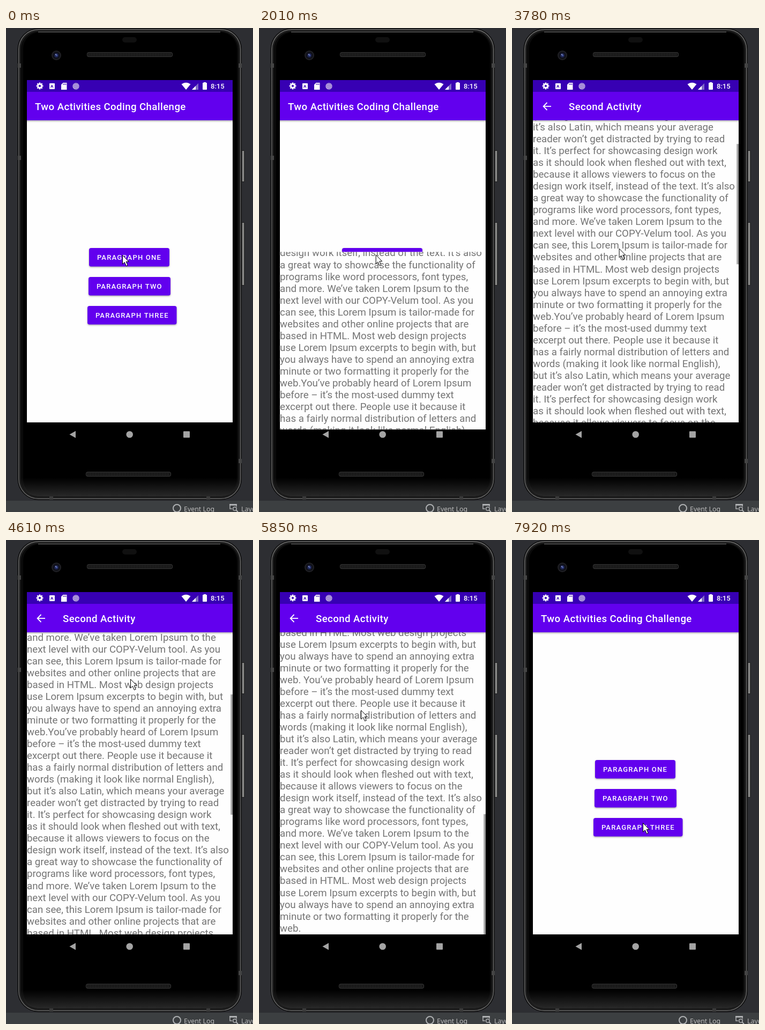
An HTML page with a canvas for the animation above (8 s loop, 461x902 px).

```html
<!DOCTYPE html>
<html lang="en">
<head>
<meta charset="utf-8">
<title>Two activities</title>
<style>
html, body { margin: 0; width: 100%; height: 100%; overflow: hidden; background: #2d2e32; }
canvas { display: block; width: 461px; height: 902px; }
</style>
</head>
<body>
<canvas id="stage"></canvas>
<script>
const W = 461, H = 902, LOOP = 8000;
const PX = 384 / 1080;   // one device pixel on the stage
const DP = PX * 2.625;
const SCREEN = { x: 39, y: 97, w: 384, bar: 119, top: 172, bottom: 735, end: 764 };
const VIEW = SCREEN.bottom - SCREEN.top;
const LINE = 62 * PX, FIRST_BASELINE = 191.6;
const PURPLE = '#6200ee', DARK_PURPLE = '#3700b3', ICON_GRAY = '#aeb0b2';
const TITLE_FONT = `500 ${20 * DP}px Roboto, sans-serif`;
const BODY_FONT = `${20 * DP}px Roboto, sans-serif`;
const LABEL_FONT = `500 ${14 * DP}px Roboto, sans-serif`;
const IDE_FONT = '12.4px "Noto Sans", sans-serif';

const canvas = document.getElementById('stage');
const ratio = window.devicePixelRatio || 1;
canvas.width = W * ratio;
canvas.height = H * ratio;
const c = canvas.getContext('2d');

const opening = [
  'You’ve probably heard of Lorem Ipsum before',
  '– it’s the most-used dummy text excerpt out',
  'there. People use it because it has a fairly',
  'normal distribution of letters and words',
  '(making it look like normal English), but',
  'it’s also Latin, which means your average'
];
const reopening = [
  'before – it’s the most-used dummy text',
  'excerpt out there. People use it because it',
  'has a fairly normal distribution of letters and',
  'words (making it look like normal English),',
  'but it’s also Latin, which means your average'
];
const rest = [
  'reader won’t get distracted by trying to read',
  'it. It’s perfect for showcasing design work',
  'as it should look when fleshed out with text,',
  'because it allows viewers to focus on the',
  'design work itself, instead of the text. It’s also',
  'a great way to showcase the functionality of',
  'programs like word processors, font types,',
  'and more. We’ve taken Lorem Ipsum to the',
  'next level with our COPY-Velum tool. As you',
  'can see, this Lorem Ipsum is tailor-made for',
  'websites and other online projects that are',
  'based in HTML. Most web design projects',
  'use Lorem Ipsum excerpts to begin with, but',
  'you always have to spend an annoying extra',
  'minute or two formatting it properly for the'
];
const heard = 'You’ve probably heard of Lorem Ipsum';
const lines = [
  ...opening, ...rest, 'web.' + heard,
  ...reopening, ...rest, 'web. ' + heard,
  ...reopening, ...rest, 'web.'
];
const MAX_SCROLL = FIRST_BASELINE + (lines.length - 1) * LINE + 15 * PX - SCREEN.bottom;

// Resting places of the pointer; it glides from one to the next
const stops = [
  { from: 0, to: 280, x: 217, y: 423 },
  { from: 1280, to: 1860, x: 219, y: 420 },
  { from: 3150, to: 3270, x: 184, y: 484 },
  { from: 4610, to: 4730, x: 232, y: 259 },
  { from: 5430, to: 5500, x: 234, y: 381 },
  { from: 6530, to: 7240, x: 71, y: 143 },
  { from: 7920, to: LOOP, x: 244, y: 527 }
];

const clamp = v => Math.max(0, Math.min(1, v));
const ramp = (t, from, to) => clamp((t - from) / (to - from));
const ease = v => v * v * (3 - 2 * v);
const mix = (a, b, p) => a + (b - a) * p;

function pointer(t) {
  const next = stops.findIndex(s => s.to >= t);
  const b = stops[next], a = stops[next - 1] || b;
  const p = a === b ? 1 : ease(ramp(t, a.to, b.from));
  return [mix(a.x, b.x, p), mix(a.y, b.y, p)];
}

function scrollAt(t) {
  const first = 290.6, second = 639.2;
  return first * ramp(t, 3270, 4610)
    + (second - first) * ramp(t, 4730, 5430)
    + (MAX_SCROLL - second) * ramp(t, 5500, 5850);
}

function rect(x, y, w, h, fill) {
  c.fillStyle = fill;
  c.fillRect(x, y, w, h);
}
function round(x, y, w, h, r, fill) {
  c.beginPath();
  c.roundRect(x, y, w, h, r);
  c.fillStyle = fill;
  c.fill();
}
function disc(x, y, r, fill) {
  c.beginPath();
  c.arc(x, y, r, 0, 7);
  c.fillStyle = fill;
  c.fill();
}
function ring(x, y, r, color, width) {
  c.beginPath();
  c.arc(x, y, r, 0, 7);
  c.strokeStyle = color;
  c.lineWidth = width;
  c.stroke();
}
function poly(points, fill) {
  c.beginPath();
  points.forEach(([x, y]) => c.lineTo(x, y));
  c.closePath();
  c.fillStyle = fill;
  c.fill();
}
function line(points, color, width) {
  c.beginPath();
  points.forEach(([x, y]) => c.lineTo(x, y));
  c.strokeStyle = color;
  c.lineWidth = width;
  c.stroke();
}
function text(str, x, y, font, fill, spacing = 0) {
  c.font = font;
  c.letterSpacing = spacing + 'px';
  c.fillStyle = fill;
  c.fillText(str, x, y);
}
function fade(x0, y0, x1, y1, ...colors) {
  const g = c.createLinearGradient(x0, y0, x1, y1);
  colors.forEach((color, i) => g.addColorStop(i / (colors.length - 1), color));
  return g;
}
function clipped(x, y, w, h, r, draw) {
  c.save();
  c.beginPath();
  c.roundRect(x, y, w, h, r);
  c.clip();
  draw();
  c.restore();
}

function speaker(x, y, w) {
  round(x, y, w, 9, 4, '#3a3a3a');
  round(x + 1, y + 1, w - 2, 7, 3, '#111');
  c.setLineDash([1, 1.5]);
  for (let row = 2.5; row < 8; row += 2) line([[x + 3, y + row], [x + w - 3, y + row]], '#484848', 1);
  c.setLineDash([]);
}

function sideKey(y, h) {
  round(438, y, 7.5, h, 2, '#1c1c1c');
  rect(440.5, y + 1, 4, h - 2, fade(440, 0, 445, 0, '#4a4a4a', '#9a9a98', '#5c5c5c'));
}

function drawPhone() {
  rect(0, 0, W, H, '#2d2e32');
  sideKey(228, 59);
  sideKey(362, 118);

  // Nested shells: dark edge, metal rim, dark bezel, black face
  const shells = ['#0b0b0b', fade(0, 0, 0, 880, '#6e6e6e', '#5a5a5a', '#666'), '#1d1d1d', '#0a0a0a'];
  [0, 1.5, 3, 6].forEach((inset, i) =>
    round(21.5 + inset, .5 + inset, 418.5 - 2 * inset, 879 - 2 * inset, 39 - inset, shells[i]));
  round(32, 8, 399, 864, 31, '#000');
  clipped(28, 7, 406, 866, 32, () =>
    rect(28, 838, 406, 36, fade(0, 838, 0, 874, 'rgba(40,40,40,0)', '#2a2a2a')));
  line([[60, 7.5], [400, 7.5]], '#777', 1);
  for (const y of [66, 238]) rect(22, y, 6, 8, '#444');
  for (const y of [66, 803]) rect(434, y, 6, 8, '#444');
  for (const x of [81, 374]) rect(x, 873, 7, 6, '#3a3a3a');

  round(217, 17, 27, 10, 5, '#101010');
  speaker(151, 45, 160);
  speaker(149, 827, 159);
  disc(94, 51, 9, '#202024');
  disc(94, 51, 7, '#101119');
  disc(94, 51, 4, '#1d2450');
  disc(94.5, 51, 1.8, '#43549a');
  disc(93, 49.5, 1, '#a9b4dd');
}

function drawIdeBar() {
  rect(0, 881, W, 21, '#3c3f41');
  ring(319, 895, 7, ICON_GRAY, 2);
  text('Event Log', 332, 901, IDE_FONT, '#bbb');
  c.lineWidth = 1.5;
  c.strokeRect(418, 888, 12, 8);
  rect(417, 887, 14, 3, ICON_GRAY);
  disc(427, 896, 5, '#3c3f41');
  ring(427, 896, 3.3, ICON_GRAY, 1.5);
  line([[429, 898], [433, 902]], ICON_GRAY, 2);
  text('Layout', 439, 901, IDE_FONT, '#bbb');
}

function drawGear(x, y) {
  for (let i = 0; i < 8; i++) {
    const a = i * Math.PI / 4;
    line([[x, y], [x + 6.4 * Math.cos(a), y + 6.4 * Math.sin(a)]], '#fff', 2.6);
  }
  disc(x, y, 4.8, '#fff');
  disc(x, y, 2.1, DARK_PURPLE);
}

function drawStatusIcons() {
  drawGear(63, 108);
  round(81, 103, 10, 11, 1, '#fff');
  text('A', 83.1, 111, '700 8px Roboto, sans-serif', DARK_PURPLE);
  poly([[106.5, 102], [113.5, 102], [113.5, 115], [103, 115], [103, 105.5]], '#fff');
  for (let i = 0; i < 3; i++) rect(106.5 + 2.3 * i, 103.5, 1.1, 2.5, DARK_PURPLE);
  disc(130.5, 108.5, 6.2, '#b39bdf');
  clipped(124.7, 102.7, 11.6, 11.6, 5.8, () => {
    for (let i = 0; i < 5; i++) line([[123 + i * 2, 106 + i * 2.5], [133 + i * 2, 103 + i * 2.5]], '#8066c3', .8);
  });
  c.beginPath();
  c.moveTo(336, 115);
  c.lineTo(327.5, 104.7);
  c.quadraticCurveTo(336, 98.8, 344.5, 104.7);
  c.fillStyle = '#fff';
  c.fill();
  poly([[347, 115], [359, 103], [359, 115]], '#806bc7');
  poly([[347, 115], [354, 108], [354, 115]], '#fff');
  rect(369, 101, 4, 2, '#fff');
  round(367, 102, 8, 13, 1, '#fff');
  text('8:15', 382, 113, LABEL_FONT, '#fff');
}

function drawNavIcons() {
  poly([[118.5, 757.5], [130, 751], [130, 764]], '#a4a4a4');
  disc(230.7, 757.5, 6.3, '#a4a4a4');
  round(331, 751.5, 12, 12, 1, '#a4a4a4');
}

function drawAppBar(title, x) {
  const { x: left, w, y, bar, top } = SCREEN;
  rect(left, top, w, 4, fade(0, top, 0, top + 4, 'rgba(0,0,0,.28)', 'rgba(0,0,0,0)'));
  rect(left, y, w, bar - y, DARK_PURPLE);
  rect(left, bar, w, top - bar, PURPLE);
  text(title, x, 153, TITLE_FONT, '#fff', .4);
}

function drawWindow() {
  rect(SCREEN.x, SCREEN.y, SCREEN.w, SCREEN.bottom - SCREEN.y, '#fefefe');
  rect(SCREEN.x, SCREEN.bottom, SCREEN.w, 45, '#000');
}

function drawButton(label, x, y, w, press = 0) {
  c.save();
  c.shadowColor = `rgba(0,0,0,${.32 + .12 * press})`;
  c.shadowBlur = 3 + 4 * press;
  c.shadowOffsetY = 1.5 + 1.5 * press;
  round(x, y, w, 34.5, 4 * DP, PURPLE);
  c.restore();
  clipped(x, y, w, 34.5, 4 * DP, () =>
    disc(217, 425, 110 * press, `rgba(255,255,255,${.24 * press})`));
  text(label, x + 16 * DP, y + 22.2, LABEL_FONT, '#fff', 1.25 * DP);
}

function drawMain(t) {
  drawWindow();
  drawAppBar('Two Activities Coding Challenge', 54);
  const press = ease(ramp(t, 600, 850)) * (1 - ease(ramp(t, 1050, 1400)));
  drawButton('PARAGRAPH ONE', 155, 410, 150, press);
  drawButton('PARAGRAPH TWO', 154, 464, 153);
  drawButton('PARAGRAPH THREE', 152, 518, 166.5);
}

function drawSecond(t) {
  const { x, w, top, bottom } = SCREEN;
  const scroll = scrollAt(t);
  drawWindow();
  clipped(x, top, w, VIEW, 0, () => {
    lines.forEach((str, i) => {
      const y = FIRST_BASELINE + i * LINE - scroll;
      if (y > top - 10 && y < bottom + 20) text(str, x, y, BODY_FONT, '#747474');
    });
    const alpha = t < 3270 ? 0 : .7 * (1 - ramp(t, 6000, 6400));
    const scale = VIEW / (VIEW + MAX_SCROLL);
    rect(419.3, top + scroll * scale, 4 * DP, VIEW * scale, `rgba(125,125,125,${alpha})`);
  });
  drawAppBar('Second Activity', 106);
  line([[73, 146], [59, 146]], '#fff', 1.8);
  line([[65.5, 139], [58.6, 146], [65.5, 153]], '#fff', 1.8);
}

function drawScreen(t) {
  const { x, y, w, end } = SCREEN, h = end - y;
  const closing = ease(ramp(t, 6980, 7380));
  const shown = ease(ramp(t, 1780, 2230)) - closing;
  clipped(x, y, w, h, 0, () => {
    if (shown < 1) {
      c.save();
      if (closing) c.translate(0, -13 * shown);
      drawMain(t);
      c.restore();
    }
    // The second window is uncovered from below while it slides up
    if (shown > 0) clipped(x, y + (1 - shown) * h, w, h, 0, () => {
      c.translate(0, 28 * (1 - shown));
      drawSecond(t);
    });
  });
  drawStatusIcons();
  drawNavIcons();
}

function drawCursor(t) {
  const [x, y] = pointer(t);
  c.save();
  c.translate(x + .5, y + .5);
  poly([[0, 0], [0, 16.5], [3.8, 13], [6.9, 20], [9.7, 18.8], [6.7, 11.9], [11.7, 11.9]], '#fff');
  c.strokeStyle = '#000';
  c.lineWidth = 1;
  c.stroke();
  c.restore();
}

function frame(now) {
  const t = now % LOOP;
  c.setTransform(ratio, 0, 0, ratio, 0, 0);
  drawPhone();
  drawIdeBar();
  drawScreen(t);
  drawCursor(t);
  requestAnimationFrame(frame);
}
requestAnimationFrame(frame);
</script>
</body>
</html>
```
